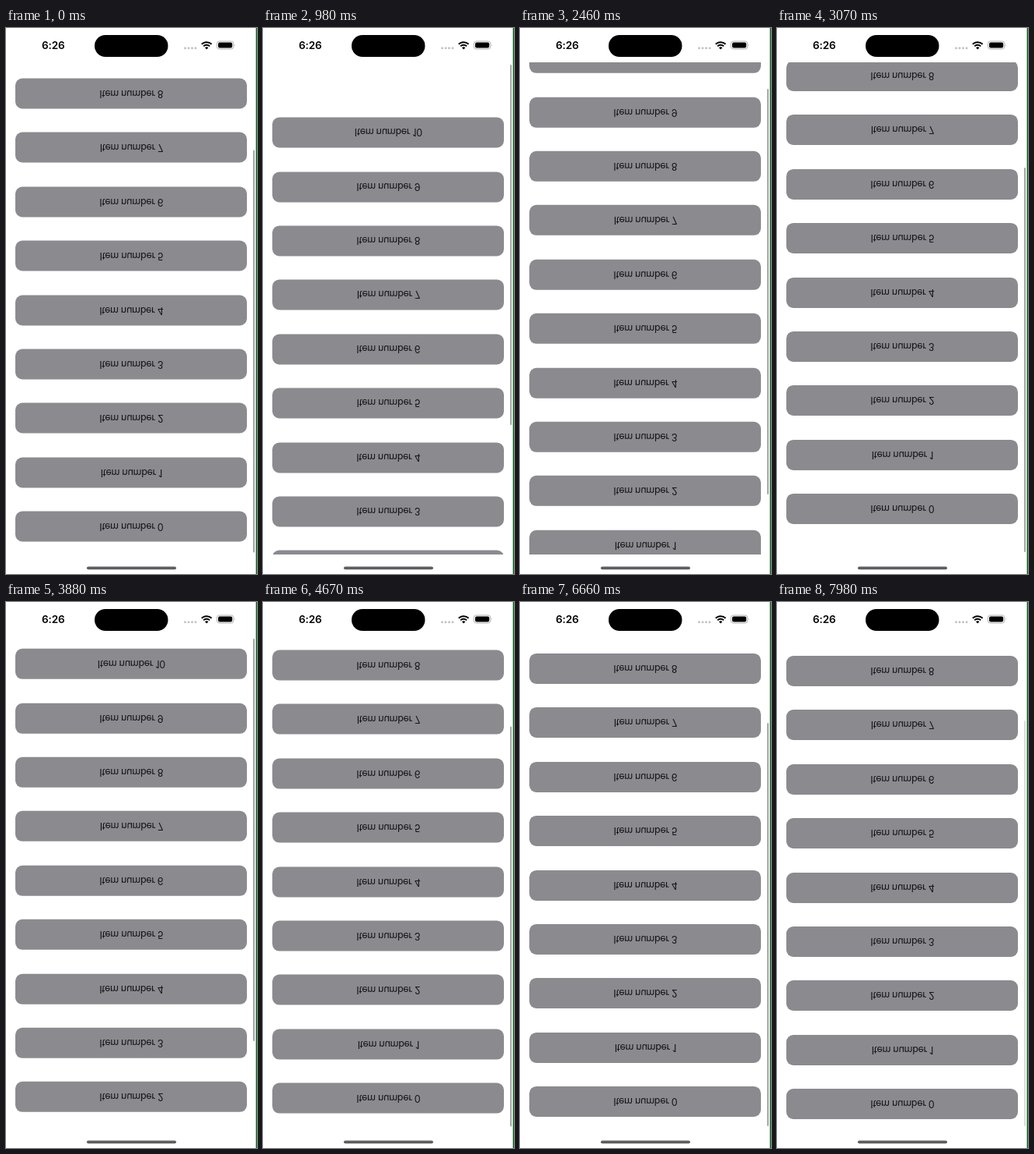
An HTML page that plays this animation: 323 by 700 pixels, repeating every 8150 ms.

```html
<!DOCTYPE html>
<html lang="en">
<head>
<meta charset="utf-8">
<title>Inverted list</title>
<style>
  html, body { margin: 0; width: 100%; height: 100%; overflow: hidden; background: #fff; }
  body { position: relative; font-family: Inter, sans-serif; }
  #view { position: absolute; left: 0; top: 44px; width: 323px; height: 631px; overflow: hidden; transform: scaleY(-1); }
  .item {
    position: absolute; left: 12.3px; width: 298px; height: 39px; border-radius: 9px;
    background: #8b8a8f; color: #161617; text-align: center;
    font-size: 12.6px; line-height: 39px; letter-spacing: -.35px;
  }
  #bar { position: absolute; left: 317.7px; top: 0; width: 2.6px; border-radius: 2px; }
  svg { position: absolute; left: 0; top: 0; }
</style>
</head>
<body>
<div id="view"><div id="list"></div></div>
<div id="bar"></div>
<svg width="323" height="700" viewBox="0 0 323 700">
  <text x="60.8" y="27.3" text-anchor="middle" font-size="13.6" font-weight="600" letter-spacing="-.2">6:26</text>
  <rect x="114" y="9" width="94.5" height="28" rx="14"/>
  <path d="M230.5 25.8h13.6" stroke="#c3c3c5" stroke-width="3" stroke-linecap="round" stroke-dasharray="0 4.5"/>
  <g fill="none" stroke="#000" stroke-width="2">
    <path d="M251.8 20.8a9.2 9.2 0 0 1 12.8 0M254.2 23.4a5.8 5.8 0 0 1 8 0"/>
  </g>
  <path d="M256 25.3a3.2 3.2 0 0 1 4.4 0L258.2 27.6z"/>
  <rect x="271.4" y="17" width="21.4" height="10" rx="3.2" fill="none" stroke="#a8a8aa" stroke-width=".9"/>
  <rect x="273" y="18.5" width="18.2" height="7" rx="2"/>
  <path d="M293.9 20.4q1.3 1.6 0 3.2z" fill="#a8a8aa"/>
  <rect x="104" y="690.4" width="115" height="3.8" rx="1.9" fill="#5e5e60"/>
  <rect x="321.6" width="1.4" height="700" fill="#0b6419"/>
</svg>
<script>
  const LOOP = 8150, MAX_SCROLL = 126, PITCH = 69.37;
  const list = document.getElementById('list');
  const bar = document.getElementById('bar');

  for (let i = 0; i <= 10; i++) {
    const item = document.createElement('div');
    item.className = 'item';
    item.textContent = 'Item number ' + i;
    item.style.top = 12 + i * PITCH + 'px';
    list.append(item);
  }

  // [time in ms, scroll offset]: flicks, overscroll and rubber-band returns
  const keys = [
    [0, -4.5], [260, 0], [600, 90], [850, 178], [930, 188], [980, 184.5], [1120, 150], [1260, 127],
    [1400, 127], [1600, 20], [1730, -34], [1950, -6], [2150, -.5], [2210, 0], [2400, 60], [2600, 150],
    [2680, 158], [2850, 80], [3000, -15], [3070, -27], [3110, -28], [3300, -6], [3420, 0], [3560, 70],
    [3680, 150], [3740, 158], [3860, 132], [3930, 127], [4190, 127], [4340, 10], [4440, -33],
    [4670, -7.5], [4850, -1.2], [5020, 0], [5440, 0], [5620, 80], [5740, 150], [5800, 158],
    [5920, 125], [6040, 52.5], [6200, -15], [6300, -34], [6500, -12], [6700, -2], [6860, 0], [LOOP, 0]
  ];

  const slope = i => keys[i + 1] && keys[i] ? (keys[i + 1][1] - keys[i][1]) / (keys[i + 1][0] - keys[i][0]) : 0;

  // Monotone tangent: flat at turning points
  function tangent(i) {
    const a = slope(i - 1), b = slope(i);
    return a * b > 0 ? 2 * a * b / (a + b) : 0;
  }

  function scrollAt(t) {
    const i = keys.findIndex(k => k[0] > t) - 1;
    const [t0, s0] = keys[i], [t1, s1] = keys[i + 1];
    const h = t1 - t0, u = (t - t0) / h, v = 1 - u;
    return v * v * ((1 + 2 * u) * s0 + u * h * tangent(i))
         + u * u * ((3 - 2 * u) * s1 - v * h * tangent(i + 1));
  }

  function draw(now) {
    const t = now % LOOP, s = scrollAt(t);
    list.style.transform = `translateY(${-s}px)`;

    const inside = Math.min(MAX_SCROLL, Math.max(0, s));
    const length = 520 - Math.abs(s - inside);
    const top = s > MAX_SCROLL ? 47 : 672 - inside / MAX_SCROLL * 105 - length;
    bar.style.height = length + 'px';
    bar.style.transform = `translateY(${top}px)`;
    bar.style.background = t < 7980 ? '#a6a6a8' : '#dcdcdd';
    requestAnimationFrame(draw);
  }

  const start = performance.now();
  const tick = () => draw(Math.max(0, performance.now() - start));
  window.requestAnimationFrame = (raf => () => raf.call(window, tick))(window.requestAnimationFrame);
  tick();
</script>
</body>
</html>
```
